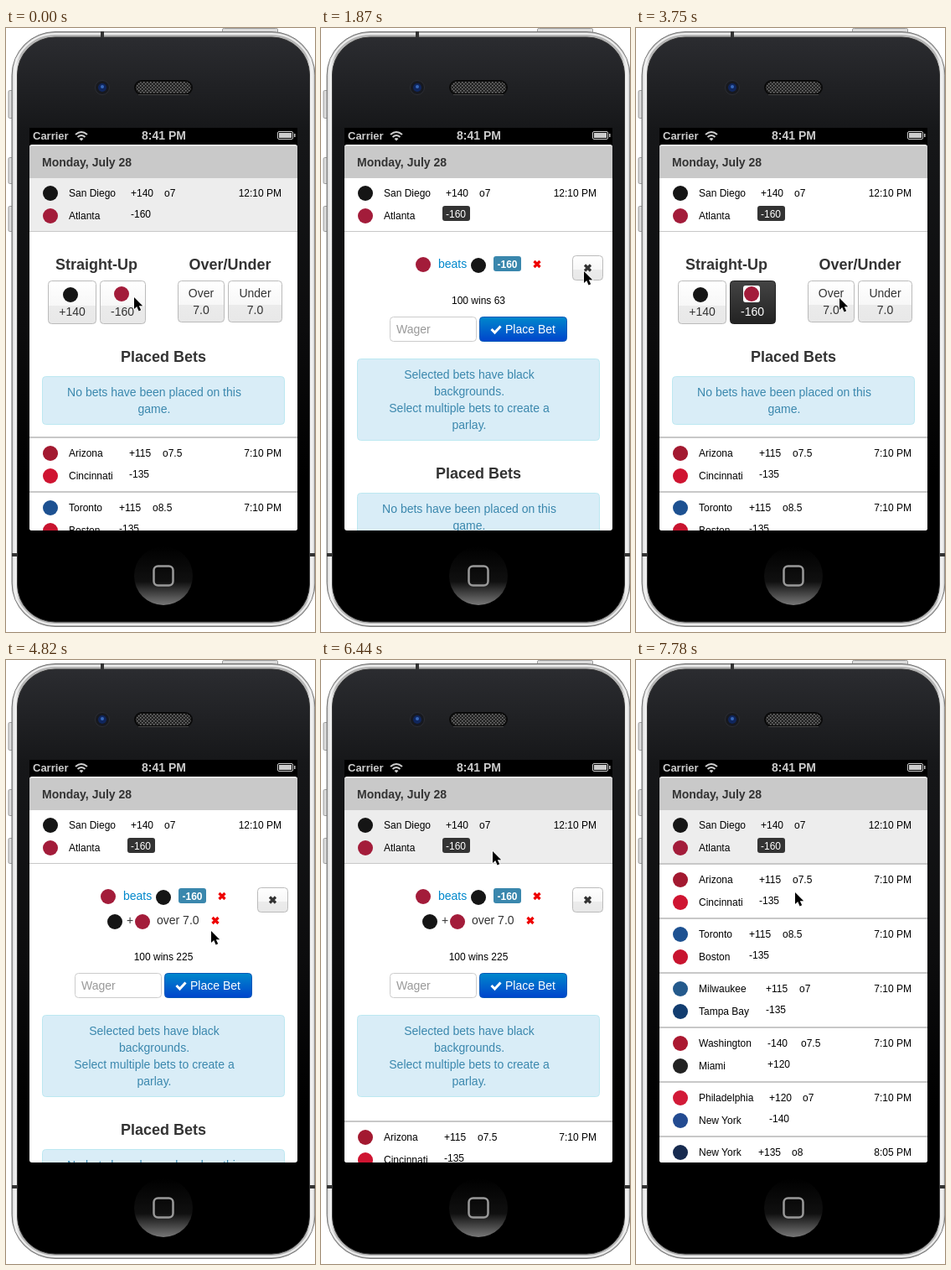
These frames come from a looping animation (369 by 720 pixels, 8 s). An HTML page:

```html
<!DOCTYPE html>
<html lang="en">
<head>
<meta charset="utf-8">
<title>Game bets</title>
<style>
html, body { margin: 0; height: 100%; overflow: hidden; background: #fff; }
svg { display: block; width: 100%; height: 100%; }
text { font-family: "Liberation Sans", Arial, sans-serif; white-space: pre; }
</style>
</head>
<body>
<svg viewBox="0 0 369 720">
  <defs>
    <linearGradient id="steel" x2="1" y2="0"><stop stop-color="#aaa"/><stop offset=".012" stop-color="#f4f4f4"/><stop offset=".03" stop-color="#b5b5b5"/><stop offset=".97" stop-color="#b5b5b5"/><stop offset=".988" stop-color="#f4f4f4"/><stop offset="1" stop-color="#aaa"/></linearGradient>
    <linearGradient id="glass" x2="0" y2="1"><stop stop-color="#2b2c30"/><stop offset=".16" stop-color="#161719"/><stop offset=".5" stop-color="#0c0c0d"/><stop offset=".75" stop-color="#000"/></linearGradient>
    <linearGradient id="home" x2="0" y2="1"><stop stop-color="#000"/><stop offset=".6" stop-color="#101010"/><stop offset="1" stop-color="#777"/></linearGradient>
    <linearGradient id="light" x2="0" y2="1"><stop stop-color="#fff"/><stop offset=".58" stop-color="#f7f7f7"/><stop offset=".58" stop-color="#ebebeb"/><stop offset="1" stop-color="#e8e8e8"/></linearGradient>
    <linearGradient id="dark" x2="0" y2="1"><stop stop-color="#444"/><stop offset="1" stop-color="#222"/></linearGradient>
    <linearGradient id="blue" x2="0" y2="1"><stop stop-color="#08c"/><stop offset="1" stop-color="#04c"/></linearGradient>
    <pattern id="mesh" width="4" height="4" patternUnits="userSpaceOnUse"><path fill="#222" d="M0 0h4v4h-4z"/><path fill="#777" d="M0 0h1.5v1.5h-1.5zM2 2h1.5v1.5h-1.5z"/></pattern>
    <clipPath id="screen"><rect x="28" y="139" width="320" height="460" rx="3"/></clipPath>
  </defs>

  <g fill="#ddd" stroke="#999">
    <path d="M258.500 5v-3.500q0-1 2-1h62q2 0 2 1v3.500"/>
    <rect x="3" y="74.500" width="6" height="33" rx="1.500"/>
    <rect x="3" y="154.500" width="6" height="31" rx="1.500"/>
    <rect x="3" y="212.500" width="6" height="30" rx="1.500"/>
  </g>
  <rect x="7" y="4.500" width="362" height="709" rx="52" fill="url(#steel)" stroke="#777"/>
  <rect x="9.500" y="7" width="357" height="704" rx="49" fill="none" stroke="#eee" stroke-width="2"/>
  <path d="M113 4h4v7h-4zM7 626h7v4h-7zM362 626h7v4h-7z" fill="#333"/>
  <rect x="13.500" y="11" width="349" height="697" rx="45" fill="url(#glass)" stroke="#333"/>

  <circle cx="115" cy="71" r="8.500" fill="#17191f" stroke="#2d2e33"/>
  <circle cx="115" cy="71" r="5" fill="#10265c"/>
  <circle cx="115" cy="70" r="2" fill="#3767b8"/>
  <rect x="154" y="63" width="68" height="16" rx="8" fill="url(#mesh)" stroke="#0a0a0a" stroke-width="2"/>
  <path d="M158 79.500h60" stroke="#444"/>
  <circle cx="188" cy="653" r="35" fill="url(#home)"/>
  <rect x="176.500" y="641.500" width="23" height="23" rx="5" fill="none" stroke="#999" stroke-width="2.500"/>

  <path d="M28 119h320v480h-320z"/>
  <g fill="#ccc" font-weight="bold">
    <text x="32" y="133" font-size="13">Carrier</text>
    <text x="188.500" y="133" font-size="14" text-anchor="middle">8:41 PM</text>
    <path d="M83 127q7-6 14 0M85.500 130q4.500-4 9 0" fill="none" stroke="#ccc" stroke-width="2"/>
    <path d="M87.500 132q2.500-2 5 0l-2.500 2.500z"/>
    <rect x="324.500" y="123.500" width="18" height="9" rx="1.500" fill="none" stroke="#ccc"/>
    <path d="M326 125h15v6h-15zM344 126h1.500v4h-1.500z"/>
  </g>

  <g clip-path="url(#screen)">
    <path d="M28 139h320v460h-320z" fill="#fff"/>
    <path d="M28 140.500h320v38.500h-320z" fill="#c9c9c9"/>
    <text x="43" y="165" font-size="14" font-weight="bold" fill="#333">Monday, July 28</text>
    <g id="page"></g>
  </g>
  <path id="cursor" d="M0 0v14l3.200-3 2.400 5.400 2.600-1.100-2.400-5.100h4.400z" stroke="#fff" stroke-width="1.200" paint-order="stroke"/>
</svg>

<script>
const page = document.getElementById("page");
const cursor = document.getElementById("cursor");

const SD = "#151515", ATL = "#a31c3a";
// top team, its colour, bottom team, its colour, odds x, odds, total, time
const games = [
  ["San Diego", SD, "Atlanta", ATL, 149, "+140", "-160", "o7", "12:10 PM"],
  ["Arizona", "#a31930", "Cincinnati", "#cf1431", 147, "+115", "-135", "o7.5", "7:10 PM"],
  ["Toronto", "#1d5191", "Boston", "#c8142f", 135, "+115", "-135", "o8.5", "7:10 PM"],
  ["Milwaukee", "#245a8c", "Tampa Bay", "#123d70", 155, "+115", "-135", "o7", "7:10 PM"],
  ["Washington", "#ab1830", "Miami", "#222", 157, "-140", "+120", "o7.5", "7:10 PM"],
  ["Philadelphia", "#d21a38", "New York", "#234b91", 159, "+120", "-140", "o7", "7:10 PM"],
  ["New York", "#172b50", "Boston", "#c8142f", 146, "+135", "-155", "o8", "8:05 PM"]
];

const text = (s, x, y, size = 14, fill = "#333", anchor = "start", weight = "normal") =>
  `<text x="${x}" y="${y}" font-size="${size}" fill="${fill}" text-anchor="${anchor}" font-weight="${weight}">${s}</text>`;
const mid = (s, x, y, size, fill, weight) => text(s, x, y, size, fill, "middle", weight);
const box = (x, y, w, h, fill, stroke = "none", r = 4) =>
  `<rect x="${x + .5}" y="${y + .5}" width="${w - 1}" height="${h - 1}" rx="${r}" fill="${fill}" stroke="${stroke}"/>`;
const badge = (x, y, w, h, fill) => `<rect x="${x}" y="${y}" width="${w}" height="${h}" rx="3" fill="${fill}"/>`;
const dot = (x, y, fill, r = 9) => `<circle cx="${x}" cy="${y}" r="${r}" fill="${fill}"/>`;
const cross = (x, y, color) =>
  `<path d="M${x - 3.5} ${y - 3.5}l7 7m0-7l-7 7" stroke="${color}" stroke-width="3.2"/>`;
const button = (x, y, w, h, fill = "url(#light)", stroke = "#bbb") => box(x, y, w, h, fill, stroke);
const heading = (s, x, y) => mid(s, x, y, 18, "#333", "bold");

function alertBox(y, lines) {
  return box(43, y, 290, lines.length * 20 + 18, "#d9edf7", "#bce8f1") +
    lines.map((s, i) => mid(s, 177, y + 24 + i * 20, 14, "#3a87ad")).join("");
}

function game([top, topColor, low, lowColor, x, odds, lowOdds, total, time], y, fill, picked, line = 2) {
  return `<path d="M28 ${y}h320v64h-320z" fill="${fill}"/>` +
    `<path d="M28 ${y + 63}h320v${line}h-320z" fill="#c8c8c8"/>` +
    dot(53, y + 18, topColor) + dot(53, y + 45, lowColor) +
    text(top, 75, y + 22, 12, "#000") + text(low, 75, y + 49, 12, "#000") +
    text(odds, x, y + 22, 12, "#000") + text(total, x + 40, y + 22, 12, "#000") +
    (picked ? badge(x - 4, y + 33, 33, 18, "#333") : "") +
    text(lowOdds, x, y + 47, 12, picked ? "#fff" : "#000") +
    text(time, 329, y + 22, 12, "#000", "end");
}

function others(y) {
  return `<path d="M28 ${y - 2}h320v2h-320z" fill="#c8c8c8"/>` +
    games.slice(1).map((g, i) => game(g, y + i * 65, "#fff")).join("");
}

const placed = y => heading("Placed Bets", 188, y) +
  alertBox(y + 17, ["No bets have been placed on this", "game."]);

function choices(picked) {
  return heading("Straight-Up", 108, 288) + heading("Over/Under", 267.5, 288) +
    button(50, 301, 58, 52) + dot(77, 318, SD) + mid("+140", 79, 343) +
    (picked ? button(112, 301, 55, 52, "url(#dark)", "#222") + badge(128, 307, 20, 20, "#fff") : button(112, 301, 55, 52)) +
    dot(138, 317, ATL) + mid("-160", 139, 343, 14, picked ? "#fff" : "#333") +
    button(205, 301, 56, 50) + mid("Over", 233, 321) + mid("7.0", 233, 341) +
    button(265, 301, 65, 50) + mid("Under", 297.5, 321) + mid("7.0", 297.5, 341) +
    placed(398) + others(424 + 65);
}

function slip(parlay, rest) {
  const y = parlay ? 29 : 0;
  return dot(122, 282, ATL) + text("beats", 140, 286, 14, "#08c") + dot(188, 283, SD) +
    badge(206, 272, 33, 18, "#3a87ad") + mid("-160", 222.5, 286, 12, "#fff", "bold") +
    cross(258, 281.5, "#e00") +
    button(300, 271, 37, 30) + cross(318.5, 286, "#333") +
    (parlay ? dot(130, 312, SD) + text("+", 144, 315) + dot(163, 312, ATL) +
      text("over 7.0", 180, 315) + cross(250, 310.500, "#e00") : "") +
    mid(parlay ? "100 wins 225" : "100 wins 63", 188, 329 + y, 12, "#000") +
    box(82, 344 + y, 104, 30, "#fff", "#ccc") + text("Wager", 90, 364 + y, 14, "#999") +
    button(189, 344 + y, 105, 30, "url(#blue)", "#0458b8") +
    `<path d="M203.500 ${359 + y}l4 4 7-7.500" fill="none" stroke="#fff" stroke-width="3"/>` +
    text("Place Bet", 220, 364 + y, 14, "#fff") +
    alertBox(394 + y, ["Selected bets have black", "backgrounds.", "Select multiple bets to create a", "parlay."]) +
    rest;
}

const first = (lit, picked, line = 1) => game(games[0], 179, lit ? "#ededed" : "#fff", picked, line);
const views = [
  [0, () => first(true, false) + choices(false)],
  [800, () => first(false, true) + slip(false, placed(537))],
  [2940, () => first(false, true) + choices(true)],
  [4820, () => first(false, true) + slip(true, placed(566))],
  [6440, () => first(true, true) + slip(true, others(551))],
  [6710, () => others(244) + first(true, true, 2)]
];

// time, x, y of the pointer tip
const moves = [
  [0, 153, 321], [270, 153, 323], [1070, 187, 310], [1330, 278, 293], [1600, 312, 291],
  [1870, 314, 290], [2940, 313, 291], [3210, 271, 315], [3480, 260, 319], [3750, 243, 322],
  [4820, 245, 323], [5360, 228, 277], [5630, 204, 226], [5900, 204, 223], [6440, 205, 228],
  [6710, 201, 235], [6980, 192, 257], [7250, 191, 267], [7510, 190, 275], [7780, 190, 277]
];

const at = (steps, t) => steps.findLast(s => s[0] <= t);
let start, shown;

function frame(now) {
  start ??= now;
  const t = (now - start) % 8000;
  const view = at(views, t), [, x, y] = at(moves, t);
  if (view !== shown) page.innerHTML = view[1]();
  shown = view;
  cursor.setAttribute("transform", `translate(${x} ${y})`);
  requestAnimationFrame(frame);
}
requestAnimationFrame(frame);
</script>
</body>
</html>
```
